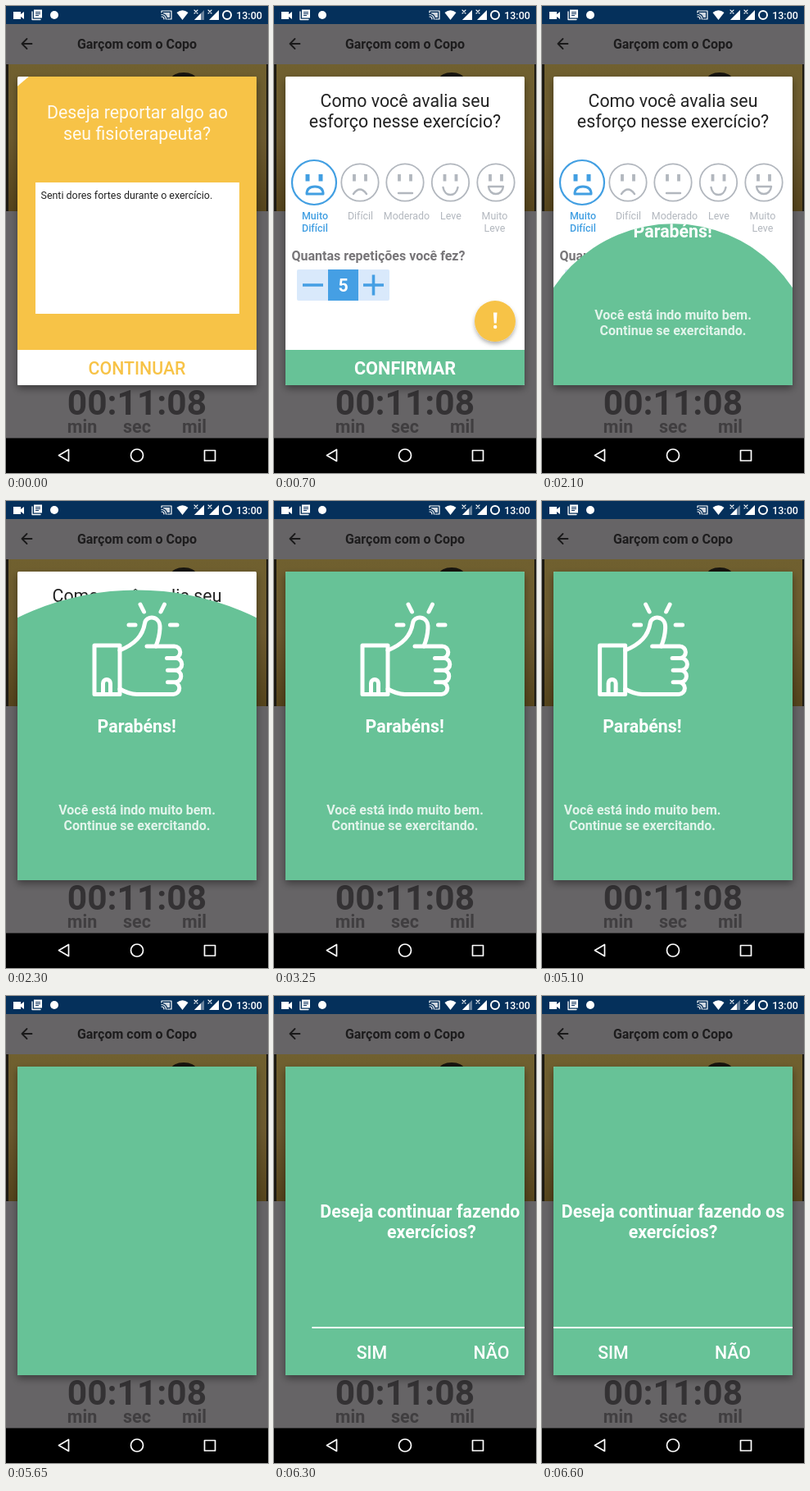
Animation, 320 px wide and 569 px high, one loop 8.65 s. Source, as an HTML page:

```html
<!DOCTYPE html>
<html lang="pt-BR">
<head>
<meta charset="utf-8">
<title>Avaliação do exercício</title>
<style>
  html, body { margin: 0; width: 100%; height: 100%; overflow: hidden; background: #000; }
  svg { display: block; width: 100vw; height: 100vh; }
  text { font-family: Roboto, sans-serif; text-anchor: middle; }
  .big { font-size: 21.33px; }
  .mid { font-size: 16px; }
  .small { font-size: 12.44px; }
  .bold { font-weight: 700; }
  .medium { font-weight: 500; }
  .left { text-anchor: start; }
  .line { fill: none; stroke-linecap: round; stroke-linejoin: round; }
</style>
</head>
<body>
<svg viewBox="0 0 320 569">
  <defs>
    <linearGradient id="wall" x2="0" y2="1">
      <stop offset="0" stop-color="#70602f"/>
      <stop offset=".5" stop-color="#6c5a2f"/>
      <stop offset="1" stop-color="#55441c"/>
    </linearGradient>
    <filter id="shadow" x="-20%" y="-20%" width="140%" height="150%">
      <feDropShadow dx="0" dy="4" stdDeviation="5" flood-opacity=".4"/>
    </filter>
    <filter id="buttonShadow" x="-30%" y="-30%" width="160%" height="170%">
      <feDropShadow dx="0" dy="3" stdDeviation="2.5" flood-opacity=".3"/>
    </filter>
    <clipPath id="cardClip"><rect x="14" y="86" width="292" height="376" rx="1.5"/></clipPath>
    <clipPath id="reportClip"><circle id="reportHole" cx="270" cy="384" r="384"/></clipPath>
    <clipPath id="praiseClip"><circle id="praiseHole" cx="160" cy="441" r="0"/></clipPath>
  </defs>

  <!-- dimmed screen behind the dialog -->
  <rect width="320" height="569" fill="#666466"/>
  <path class="line" d="M31.500 46H20M25.500 40l-6 6 6 6" stroke="#1a191a" stroke-width="1.800"/>
  <text class="mid bold" x="160" y="52" fill="#1d1c1d">Garçom com o Copo</text>
  <rect y="71" width="320" height="179" fill="#1d1a12"/>
  <rect x="3" y="71" width="315" height="179" fill="url(#wall)"/>
  <ellipse cx="217" cy="89" rx="15" ry="8" fill="#17140e"/>
  <text class="bold" x="160" y="498" font-size="42.500" fill="#343234">00:11:08</text>
  <g class="bold" font-size="21.500" fill="#403e40">
    <text x="93" y="520">min</text>
    <text x="160" y="520">sec</text>
    <text x="230" y="520">mil</text>
  </g>

  <!-- status bar -->
  <rect width="320" height="22" fill="#05305b"/>
  <g fill="#fff">
    <path d="M9 7h9v3l4-3v9l-4-3v3H9z"/>
    <path d="M34 4.500h10v10H34z"/>
    <path class="line" d="M32 7v9.500h10" stroke="#fff" stroke-width="1.300"/>
    <path d="M36 7.500h6M36 9.500h6M36 11.500h4" stroke="#05305b"/>
    <circle cx="59" cy="11" r="5"/>
    <path class="line" d="M190 8V6h12v10h-5M190 10.500a5.500 5.500 0 0 1 5.500 5.500M190 13a3 3 0 0 1 3 3" stroke="#fff" stroke-width="1.200"/>
    <path d="M192 8h8v6h-3q-1-4-5-5z" opacity=".8"/>
    <path d="M208.500 8q7-5.500 14 0l-7 9z"/>
    <path d="M242 5v12h-12z" opacity=".4"/>
    <path id="signal"/>
    <path d="M260 5v12h-12z"/>
    <path class="line" d="M230 5l4 4m0-4l-4 4M247 5l4 4m0-4l-4 4" stroke="#fff" stroke-width="1.100"/>
    <circle cx="270" cy="11" r="5" fill="none" stroke="#fff" stroke-width="2"/>
    <text class="medium" x="297" y="15.500" font-size="12.500">13:00</text>
  </g>

  <!-- navigation bar -->
  <rect y="526.500" width="320" height="42.500"/>
  <g class="line" stroke="#fff" stroke-width="1.700">
    <path d="M64.500 547.500l12-7v14z"/>
    <circle cx="160" cy="547.500" r="7.500"/>
    <path d="M242.500 541.500h13v12.500h-13z"/>
  </g>

  <rect x="14" y="86" width="292" height="376" rx="1.500" fill="#fff" filter="url(#shadow)"/>
  <g clip-path="url(#cardClip)">
    <!-- effort rating -->
    <g class="big" fill="#222">
      <text x="160" y="123">Como você avalia seu</text>
      <text x="160" y="148">esforço nesse exercício?</text>
    </g>
    <g id="faces"></g>
    <text class="mid bold left" x="21.500" y="310" fill="#777578">Quantas repetições você fez?</text>
    <rect x="28" y="321" width="113" height="38" rx="2" fill="#d9e9fb"/>
    <rect x="66" y="321" width="37" height="38" fill="#459fe4"/>
    <path d="M35 340h25M109 340h25M121.500 327.500v25" stroke="#459fe4" stroke-width="3.600"/>
    <text class="big bold" x="84.500" y="348" fill="#fff">5</text>
    <circle cx="270" cy="384" r="25" fill="#f7c347" filter="url(#buttonShadow)"/>
    <path d="M268 373.500h4.500l-.8 13h-2.900z" fill="#fff"/>
    <circle cx="270.200" cy="391" r="2.200" fill="#fff"/>
    <rect x="14" y="419" width="292" height="43" fill="#67c297"/>
    <text class="bold" x="160" y="448.500" font-size="21.700" fill="#fff">CONFIRMAR</text>

    <!-- report to the therapist -->
    <g id="report" clip-path="url(#reportClip)">
      <rect x="14" y="86" width="292" height="333" fill="#f7c347"/>
      <g class="big" fill="#fffaf0">
        <text x="160.500" y="137">Deseja reportar algo ao</text>
        <text x="160" y="163">seu fisioterapeuta?</text>
      </g>
      <rect x="36" y="215" width="249" height="160" fill="#fff"/>
      <text class="small left" x="42.500" y="235" fill="#222">Senti dores fortes durante o exercício.</text>
      <rect x="14" y="419" width="292" height="43" fill="#fff"/>
      <text class="big medium" x="160" y="449" fill="#f7c347">CONTINUAR</text>
    </g>

    <!-- praise and closing question -->
    <g clip-path="url(#praiseClip)">
      <rect x="14" y="86" width="292" height="376" fill="#67c297"/>
      <g id="praise" fill="#fff">
        <g class="line" stroke="#fff" stroke-width="5">
          <path d="M164 126l4.500 9M193.500 126l-4.500 9M150 151h8M200.500 151h8.500" />
          <path d="M108 176h31v59.500h-31zM118.500 235v-13a4.500 4.500 0 0 1 9 0v13"/>
          <path d="M139 182C158 174 167 164 169.500 149C171 139 189 139 188 155Q187.500 166 183 177"/>
          <path d="M172 177h33.500a7.300 7.300 0 0 1 0 14.600h-9m9 0h2a7.300 7.300 0 0 1 0 14.600h-10m9 0a7.300 7.300 0 0 1 0 14.600h-9m7 0a7.300 7.300 0 0 1 0 14.600H160Q150 235.500 139 229"/>
        </g>
        <text class="big bold" x="159.700" y="282">Parabéns!</text>
        <g class="mid bold" fill="#e2f4eb">
          <text x="160" y="382">Você está indo muito bem.</text>
          <text x="160" y="401">Continue se exercitando.</text>
        </g>
      </g>
      <g id="question" fill="#fff">
        <g class="big bold">
          <text x="160" y="270">Deseja continuar fazendo os</text>
          <text x="160" y="295">exercícios?</text>
        </g>
        <rect x="14" y="403" width="292" height="2"/>
        <g class="big medium">
          <text x="87" y="442">SIM</text>
          <text x="233" y="442">NÃO</text>
        </g>
      </g>
    </g>
  </g>
</svg>
<script>
const LOOP = 8650, TICK = 50;
const $ = id => document.getElementById(id);

const faces = [
  { x: 49, label: ['Muito', 'Difícil'], mouth: 'M-9 14Q-9 5 1 5T11 14z', active: true },
  { x: 105, label: ['Difícil'], mouth: 'M-8 14Q0 3 8 14' },
  { x: 160, label: ['Moderado'], mouth: 'M-8 13H9' },
  { x: 215.5, label: ['Leve'], mouth: 'M-9 6C-7 18 7 18 9 6' },
  { x: 271, label: ['Muito', 'Leve'], mouth: 'M-9 5H9C8 17-8 17-9 5z' }
];
const labelX = [50, 105.5, 162, 216, 269.5];

$('faces').innerHTML = faces.map(({ x, label, mouth, active }, i) => {
  const color = active ? '#429fe2' : '#b2b7be';
  const eye = active ? 8 : 7;
  const lines = label.map((word, row) =>
    `<text class="small ${active ? 'medium' : ''}" x="${labelX[i]}" y="${260 + row * 15}" fill="${color}">${word}</text>`);
  return `<g class="line" transform="translate(${x} 215)" stroke="${color}" stroke-width="${active ? 2.2 : 1.8}">
    <circle r="${active ? 27 : 22.7}"/>
    <path d="M${-eye} -10v8.500M${eye} -10v8.500" stroke-linecap="butt" stroke-width="${active ? 5 : 3.8}"/>
    <path d="${mouth}" stroke-width="${active ? 3 : 2.4}"/></g>${lines.join('')}`;
}).join('');

const progress = (t, start, duration) => Math.min(1, Math.max(0, (t - start) / duration));
const easeInOut = p => (1 - Math.cos(Math.PI * p)) / 2;
const easeIn = p => p * p;
const easeOut = p => 1 - (1 - p) ** 2;
const mix = (a, b, p) => a + (b - a) * p;
const shift = (id, x) => $(id).setAttribute('transform', `translate(${x.toFixed(2)} 0)`);

function draw(t) {
  $('reportHole').setAttribute('r', mix(393, 25, easeInOut(progress(t, -50, 500))));
  $('report').style.display = t < 450 ? '' : 'none';

  const reveal = t < 2450 ? easeInOut(progress(t, 1770, 700)) : 1;
  $('praiseHole').setAttribute('r', mix(0, 386, reveal));

  shift('praise', mix(0, -300, easeIn(progress(t, 4800, 850))));
  $('praise').style.display = t < 5650 ? '' : 'none';
  shift('question', mix(292, 0, easeOut(progress(t, 5700, 900))));
  $('question').style.display = t < 5750 ? 'none' : '';

  const level = t >= 700 && t < 3250 ? 12 : 8;
  $('signal').setAttribute('d', `M230 17h${level}v${-level}z`);
}

const start = performance.now();
function frame() {
  const t = (performance.now() - start) % LOOP;
  draw(Math.floor(t / TICK) * TICK);
  requestAnimationFrame(frame);
}
frame();
</script>
</body>
</html>
```
